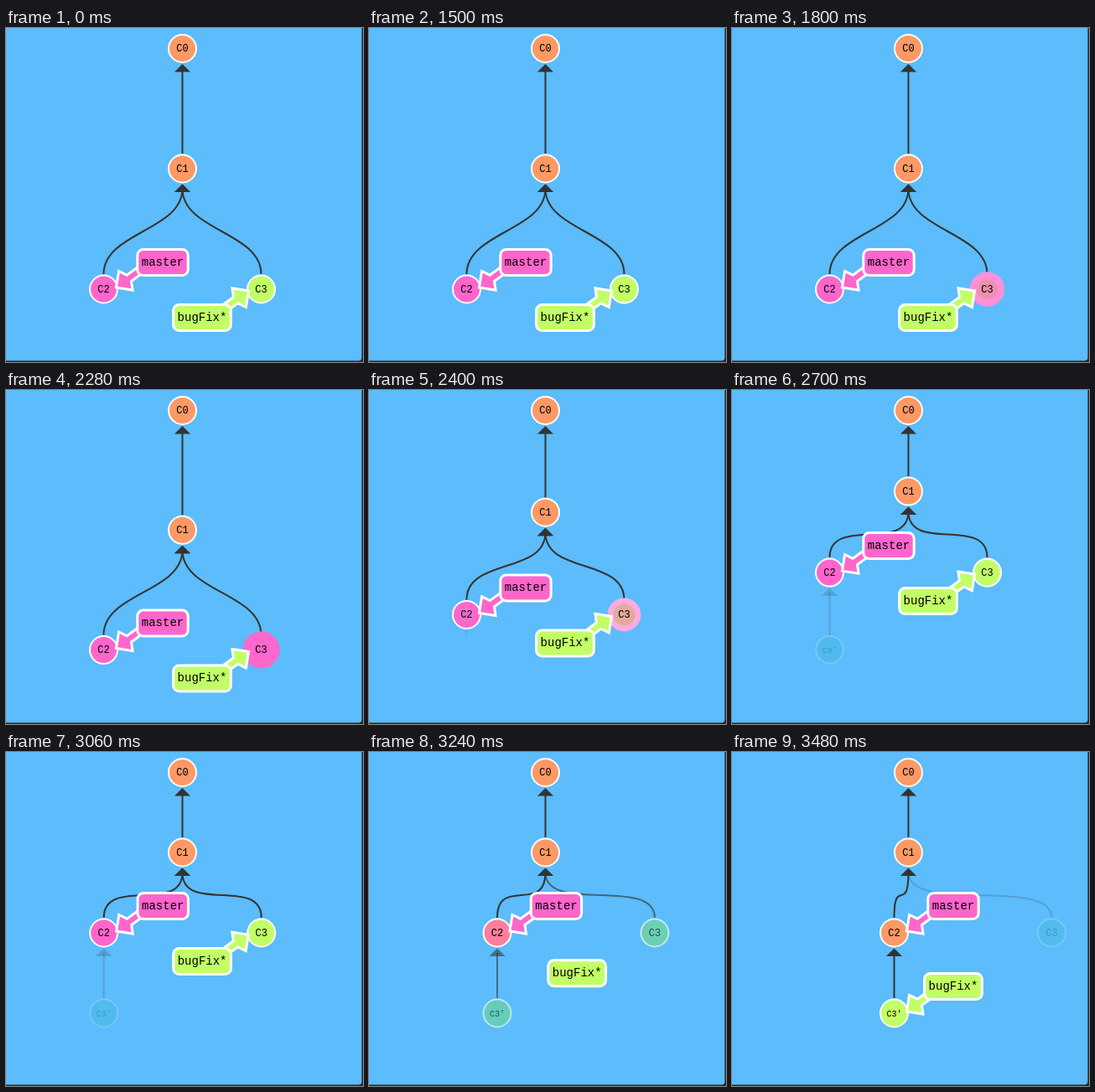
Write an HTML page with a canvas that moves like this. It is 426 px wide and 399 px high and loops after 6.48 s.

```html
<!DOCTYPE html>
<html lang="en">
<head>
<meta charset="utf-8">
<title>Commit graph rebase</title>
<style>
html, body { margin: 0; width: 100%; height: 100%; overflow: hidden; background: #262626; }
canvas { display: block; }
</style>
</head>
<body>
<canvas id="stage" width="426" height="399"></canvas>
<script>
const ctx = document.getElementById('stage').getContext('2d');
const LOOP = 6480, STEP = 60;
const ORANGE = [255, 153, 102], PINK = [255, 102, 204], GREEN = [194, 255, 102];
const TEAL = [36, 179, 179], WHITE = [255, 255, 255], DARK = '#333';
const FONT = '"Liberation Mono", "Courier New", monospace';

const clamp = v => Math.min(1, Math.max(0, v));
const lerp = (a, b, p) => a + (b - a) * p;
const mix = (a, b, p) => a.map((v, i) => lerp(v, b[i], p));
const rgb = c => `rgb(${c.map(Math.round)})`;
const smooth = p => p * p * (3 - 2 * p);

function bounce(p) {
  const k = 7.5625, d = 2.75;
  if (p < 1 / d) return k * p * p;
  if (p < 2 / d) return k * (p - 1.5 / d) ** 2 + 0.75;
  if (p < 2.5 / d) return k * (p - 2.25 / d) ** 2 + 0.9375;
  return k * (p - 2.625 / d) ** 2 + 0.984375;
}

function text(str, x, y, size) {
  ctx.font = `${size}px ${FONT}`;
  ctx.textAlign = 'center';
  ctx.fillStyle = '#000';
  ctx.fillText(str, x, y);
}

function edge(child, parent, alpha = 1, headAlpha = alpha) {
  const y0 = child.y - 18, y1 = parent.y + 24;
  const bend = Math.min(50, Math.max(0, y0 - y1));
  ctx.globalAlpha = alpha;
  ctx.strokeStyle = ctx.fillStyle = DARK;
  ctx.lineWidth = 2;
  ctx.beginPath();
  ctx.moveTo(child.x, y0);
  ctx.bezierCurveTo(child.x, y0 - bend, parent.x, y1 + bend, parent.x, y1);
  ctx.stroke();
  ctx.globalAlpha = headAlpha;
  ctx.beginPath();
  ctx.moveTo(parent.x, parent.y + 18.5);
  ctx.lineTo(parent.x + 9.5, parent.y + 28);
  ctx.lineTo(parent.x - 9.5, parent.y + 28);
  ctx.fill();
  ctx.globalAlpha = 1;
}

function node({ name, x, y, fill, r = 16.5, stroke = WHITE, width = 2, alpha = 1 }) {
  if (alpha <= 0) return;
  ctx.globalAlpha = alpha;
  ctx.beginPath();
  ctx.arc(x, y, r, 0, 7);
  ctx.fillStyle = rgb(fill);
  ctx.fill();
  ctx.strokeStyle = rgb(stroke);
  ctx.lineWidth = width;
  ctx.stroke();
  text(name, x, y + 3.7, (name.length > 2 ? 10 : 12) * r / 16.5);
  ctx.globalAlpha = 1;
}

// side is 1 with the label up and right of its node, -1 for the mirrored place
function branch(name, at, side, fill) {
  ctx.fillStyle = rgb(fill);
  ctx.strokeStyle = '#fff';
  ctx.lineWidth = 3;
  const c = Math.cos(Math.PI / 5), s = -Math.sin(Math.PI / 5);
  const arrow = [[0, 0], [14, -14], [19, -4.5], [49, -4.5], [49, 4.5], [19, 4.5], [14, 14]];
  ctx.beginPath();
  for (const [u, v] of arrow) {
    ctx.lineTo(at.x + side * (15 + u * c - v * s), at.y + side * (-2 + u * s + v * c));
  }
  ctx.closePath();
  ctx.fill();
  ctx.stroke();

  const x = at.x + side * 70.5, y = at.y - side * 33 + 1;
  const w = name.length * 8.4 + 10;
  ctx.beginPath();
  ctx.roundRect(x - w / 2, y - 15.5, w, 31, 7);
  ctx.fill();
  ctx.stroke();
  text(name, x, y + 3.5, 14);
}

function draw(t) {
  const glow = smooth(clamp((t - 1475) / 500));
  const birth = clamp((t - 2253) / 600);
  const rise = bounce(birth);
  const shift = smooth(clamp((t - 3047) / 400));
  const lit = glow * (1 - rise);
  const row = lerp(312, 216, rise);
  const ghost = lerp(1, 0.2, shift);
  const copyAlpha = lerp(0.2 * rise, 1, shift);

  const c0 = { name: 'C0', x: 210.5, y: 24.5, fill: ORANGE };
  const c1 = { name: 'C1', x: 210.5, y: lerp(168, 120, rise), fill: ORANGE };
  const c2 = { name: 'C2', x: lerp(116.5, 193.5, shift), y: row, fill: mix(PINK, ORANGE, shift) };
  const c3 = {
    name: 'C3', x: lerp(304.5, 381.5, shift), y: row,
    fill: mix(mix(GREEN, PINK, lit), TEAL, shift),
    stroke: mix(WHITE, PINK, lit), width: lerp(2, 11, lit), alpha: ghost
  };
  const copy = {
    name: "C3'", x: c2.x, y: lerp(232, 312, rise), r: 16.5 * rise,
    fill: mix(TEAL, GREEN, shift), alpha: copyAlpha
  };

  ctx.fillStyle = '#262626';
  ctx.fillRect(0, 0, 426, 399);
  ctx.fillStyle = '#5cbcfc';
  ctx.beginPath();
  ctx.roundRect(0, 0, 424.5, 397.5, [0, 0, 4, 0]);
  ctx.fill();

  edge(c1, c0);
  edge(c2, c1);
  edge(c3, c1, ghost);
  if (birth > 0) edge(copy, c2, copyAlpha, copyAlpha * clamp((birth - 0.45) / 0.3));
  [c0, c1, c2, c3, copy].forEach(node);

  branch('master', c2, 1, PINK);
  const head = { x: lerp(304.5, 193.5, shift), y: lerp(row, 312, shift) };
  branch('bugFix*', head, lerp(-1, 1, shift), GREEN);
}

const start = performance.now();
function tick() {
  const t = (performance.now() - start) % LOOP;
  draw(Math.floor(t / STEP) * STEP);
  requestAnimationFrame(tick);
}
tick();
</script>
</body>
</html>
```
